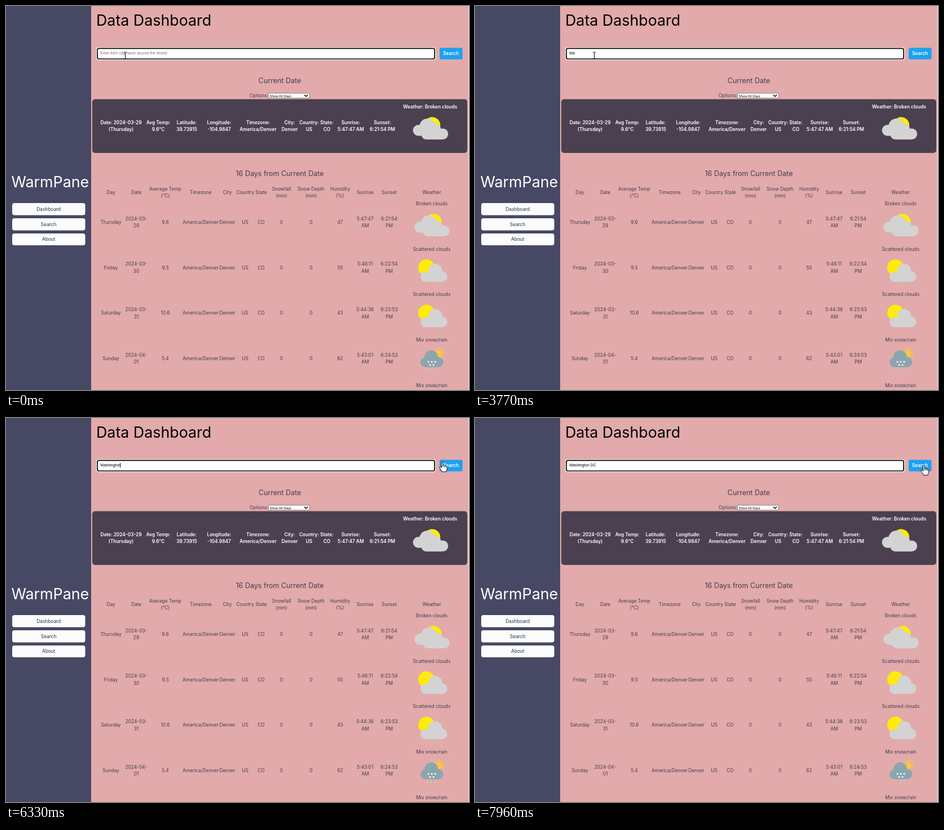
An HTML page for the animation above (7.99 s loop, 821 by 682 pixels).

```html
<!DOCTYPE html>
<html lang="en">
<head>
<meta charset="utf-8">
<title>Weather dashboard</title>
<style>
  html, body { margin: 0; width: 100%; height: 100%; overflow: hidden; background: #e2aaaa; }
  svg { display: block; position: absolute; left: 0; top: 0; }
  text { font: 400 8.35px Inter, sans-serif; font-optical-sizing: none; fill: #423e50; text-anchor: middle; }
  .title { font-size: 26.8px; text-anchor: start; }
  .heading { font-size: 12.5px; }
  .bold { font-size: 8.3px; font-weight: 560; fill: #fff; }
  .nav { fill: #213547; }
  .select { font: 6px "Liberation Sans", Arial, sans-serif; fill: #000; text-anchor: start; }
  #field {
    position: absolute; left: 167px; top: 79.3px; white-space: pre;
    font: 6.85px/10px "Liberation Sans", Arial, sans-serif; color: #000;
  }
  #field.empty { color: #757575; }
</style>
</head>
<body>
<svg width="821" height="682" viewBox="0 0 821 682">
  <defs>
    <g id="broken">
      <circle cx="34.5" cy="14.3" r="14.3" fill="#ffeb0a"/>
      <g fill="#d3d3d3">
        <circle cx="26" cy="17" r="14.3"/><circle cx="10" cy="23.5" r="9.7"/>
        <rect x="10" y="20" width="20" height="13.2"/>
        <circle cx="39" cy="23" r="11.3"/><circle cx="24" cy="31" r="8.7"/>
        <circle cx="53" cy="30" r="9.8"/><rect x="24" y="25" width="29" height="14.8"/>
      </g>
    </g>
    <g id="scattered">
      <circle cx="14.5" cy="15" r="14.5" fill="#ffeb0a"/>
      <g fill="#d3d3d3">
        <circle cx="30" cy="20.5" r="12.3"/><circle cx="13" cy="31.5" r="9"/>
        <circle cx="42" cy="31" r="9.5"/><rect x="13" y="25" width="29" height="15.5"/>
      </g>
    </g>
    <g id="mix">
      <circle cx="33" cy="10.5" r="8.7" fill="none" stroke="#fdc540" stroke-width="2.8" stroke-dasharray="2.2 2.35"/>
      <circle cx="33" cy="10.5" r="6" fill="#fdc540"/>
      <g fill="#8ba6af">
        <circle cx="19" cy="17" r="12"/><circle cx="8.5" cy="26.5" r="8.5"/>
        <circle cx="31.5" cy="26" r="9"/><rect x="8.5" y="20" width="23" height="15"/>
      </g>
      <g fill="none" stroke-linecap="round">
        <path d="M14 25.5h.01M20 25.5h.01M26 25.5h.01M17 31h.01M23 31h.01" stroke="#fff" stroke-width="3"/>
        <path d="M11.5 37.8h.01M19 37.8h.01M26.5 37.8h.01M11.5 41.5h.01M19 41.5h.01M26.5 41.5h.01" stroke="#c3bfc6" stroke-width="2.8"/>
      </g>
    </g>
  </defs>

  <rect width="821" height="682" fill="#e2aaaa"/>
  <rect x="820" width="1" height="682" fill="#f6e6e6"/>
  <rect width="151" height="682" fill="#474864"/>
  <g fill="#fcfcfc">
    <rect x="11" y="350" width="129.5" height="21.5" rx="4"/>
    <rect x="11" y="377" width="129.5" height="21.5" rx="4"/>
    <rect x="11" y="404" width="129.5" height="21" rx="4"/>
  </g>

  <rect x="160" y="73.4" width="602" height="22.6" rx="4" fill="#fff"/>
  <rect x="162" y="75.3" width="598" height="18.7" rx="2.5" fill="#fff" stroke="#000" stroke-width="1.7"/>
  <rect x="769" y="74.3" width="40.5" height="20.5" rx="2.5" fill="#1da1f2"/>

  <rect x="465.4" y="155" width="73.2" height="8.6" fill="#fff" stroke="#767676" stroke-width=".8"/>
  <path d="M529 157.7l3 3 3-3" fill="none" stroke="#000" stroke-width="1.4"/>
  <rect x="153" y="165.5" width="665" height="95.5" rx="5" fill="#4a4050"/>

  <use href="#broken" x="721.3" y="197.3"/>
  <use href="#broken" x="723.8" y="369.3"/>
  <use href="#scattered" x="731" y="449.5"/>
  <use href="#scattered" x="731" y="530"/>
  <use href="#mix" x="735" y="606.5"/>
  <g id="labels"></g>
</svg>

<div id="field"></div>

<svg width="821" height="682" viewBox="0 0 821 682">
  <rect id="caret" y="80" width="1" height="8"/>
  <g id="pointer">
    <path id="beam" d="M-2.5-5.5H-.8L0-5 .8-5.5H2.5M0-5V5.5M-2.5 6H-.8L0 5.5 .8 6H2.5" fill="none" stroke="#000"/>
    <path id="arrow" d="M0 0V12.5L2.9 9.9 4.9 14.6 6.9 13.7 4.9 9.2H8.6Z" fill="#fff" stroke="#000" stroke-width=".9"/>
    <path id="hand" d="M-1.3 1.2Q-1.3 0 0 0T1.3 1.2V6Q3.7 5 4 6.7 6 6 6.4 7.5 8.6 7 8.6 9V12Q8.6 14 7.3 15.5V17.5H-.7V16Q-2.5 14-4.7 10.7-5.2 8.8-3.6 8.4-2.5 8.6-1.3 10.4ZM1.3 6V9M4 7V9.3M6.4 7.8V9.6" fill="#fff" stroke="#000" stroke-width=".9" stroke-linejoin="round"/>
  </g>
</svg>

<script>
const LOOP = 7990;
const $ = id => document.getElementById(id);
const labels = $('labels'), field = $('field'), caret = $('caret'), pointer = $('pointer');

// x and y give the centre of the text block; "|" breaks a line.
function label(text, x, y, cls = '', drop = 3) {
  const lines = text.split('|');
  lines.forEach((line, i) => {
    const node = document.createElementNS('http://www.w3.org/2000/svg', 'text');
    node.setAttribute('x', x);
    node.setAttribute('y', y + drop + (i - (lines.length - 1) / 2) * 12.6);
    node.setAttribute('class', cls);
    node.textContent = line;
    labels.append(node);
  });
  return labels.lastChild;
}
const row = (cells, xs, y, cls) => cells.forEach((text, i) => label(text, xs[i], y, cls));

label('Data Dashboard', 160, 25, 'title', 9.5).style.fill = '#000';
label('WarmPane', 9.5, 312.5, 'title', 9.5).style.fill = '#fff';
['Dashboard', 'Search', 'About'].forEach((name, i) => label(name, 75.7, 360.6 + i * 26.9, 'nav'));
label('Search', 789, 84.4, 'bold');
label('Current Date', 485.5, 133, 'heading', 4.4);
label('16 Days from Current Date', 485.5, 298, 'heading', 4.4);
label('Options:', 448.5, 159);
label('Show All Days', 467.5, 159.2, 'select', 2.3);

row(['Date: 2024-03-29|(Thursday)', 'Avg Temp:|9.6°C', 'Latitude:|39.73915', 'Longitude:|-104.9847',
  'Timezone:|America/Denver', 'City:|Denver', 'Country:|US', 'State:|CO', 'Sunrise:|5:47:47 AM', 'Sunset:|6:21:54 PM'],
  [204, 270, 320.5, 378, 447, 503, 537.5, 569, 611.3, 667.5], 212.8, 'bold');
label('Weather: Broken clouds', 752, 179, 'bold');

const columns = [186, 231, 282.5, 345.3, 392.5, 424, 452.5, 488.5, 541, 592.5, 636.8, 679.5, 754.8];
row(['Day', 'Date', 'Average Temp|(°C)', 'Timezone', 'City', 'Country', 'State', 'Snowfall|(mm)',
  'Snow Depth|(mm)', 'Humidity|(%)', 'Sunrise', 'Sunset', 'Weather'], columns, 330.8);
[
  ['Thursday', '03-|29', '9.6', '47', '5:47:47', '6:21:54'],
  ['Friday', '03-|30', '9.5', '55', '5:46:11', '6:22:54'],
  ['Saturday', '03-|31', '10.6', '43', '5:44:36', '6:23:53'],
  ['Sunday', '04-|01', '5.4', '62', '5:43:01', '6:24:53'],
].forEach(([day, date, temp, humidity, rise, set], i) =>
  row([day, '2024-' + date, temp, 'America/Denver', 'Denver', 'US', 'CO', '0', '0', humidity,
    rise + '|AM', set + '|PM'], columns, 384 + i * 80.7));
['Broken clouds', 'Scattered clouds', 'Scattered clouds', 'Mix snow/rain', 'Mix snow/rain']
  .forEach((sky, i) => label(sky, columns[12], 351 + i * 80.7));

const PLACEHOLDER = 'Enter ANY city name around the World!';
const CITY = 'Washington DC';
const keyTimes = [2960, 3240, 3900, 4020, 4170, 4270, 4380, 4720, 4800, 4900, 7120, 7240, 7360];
const blinkTimes = [150, 680, 1190, 1710, 2250, 2780];

// Pointer stops: time, x, y.
const path = [
  [5610, 211, 87], [5700, 300, 80], [5790, 560, 55], [5850, 740, 23], [5880, 767, 20],
  [5970, 770, 16], [6060, 769, 26], [6200, 769, 58], [6330, 773.5, 78], [6420, 773.5, 78],
  [6630, 775, 79], [7120, 775, 79], [7240, 791, 81], [7360, 806, 84], [7510, 806, 84],
  [7580, 807, 90], [7660, 801, 92], [7840, 801, 92], [7960, 796, 84],
];

function pointerAt(t) {
  const next = path.findIndex(stop => stop[0] > t);
  if (next === 0) return path[0].slice(1);
  if (next < 0) return path[path.length - 1].slice(1);
  const [t0, x0, y0] = path[next - 1], [t1, x1, y1] = path[next];
  const k = (t - t0) / (t1 - t0);
  return [x0 + (x1 - x0) * k, y0 + (y1 - y0) * k];
}

function caretOn(t, typed) {
  if (!typed) return blinkTimes.filter(time => time <= t).length % 2 === 1;
  if (t >= 6490 && t < 7120) return false;
  return Math.floor((t - keyTimes[typed - 1]) / 530) % 2 === 0;
}

let shown = -1;
function draw(t) {
  const typed = keyTimes.filter(time => time <= t).length;
  if (typed !== shown) {
    shown = typed;
    field.textContent = typed ? CITY.slice(0, typed) : PLACEHOLDER;
    field.className = typed ? '' : 'empty';
    caret.setAttribute('x', 167 + (typed ? Math.floor(field.getBoundingClientRect().width) : 0));
  }
  caret.style.visibility = caretOn(t, typed) ? 'visible' : 'hidden';

  const [x, y] = pointerAt(t);
  const inField = x > 161 && x < 761 && y > 74 && y < 95;
  const onButton = x >= 769 && x < 809.5 && y >= 74 && y < 95;
  const shape = inField ? 'beam' : onButton ? 'hand' : 'arrow';
  for (const id of ['beam', 'arrow', 'hand']) $(id).style.display = id === shape ? '' : 'none';
  const snap = v => shape === 'beam' ? Math.floor(v) + .5 : Math.round(v * 2) / 2;
  pointer.setAttribute('transform', `translate(${snap(x)} ${snap(y)})`);
}

const start = performance.now();
function tick() {
  draw((performance.now() - start) % LOOP);
  requestAnimationFrame(tick);
}
draw(0);
tick();
</script>
</body>
</html>
```
